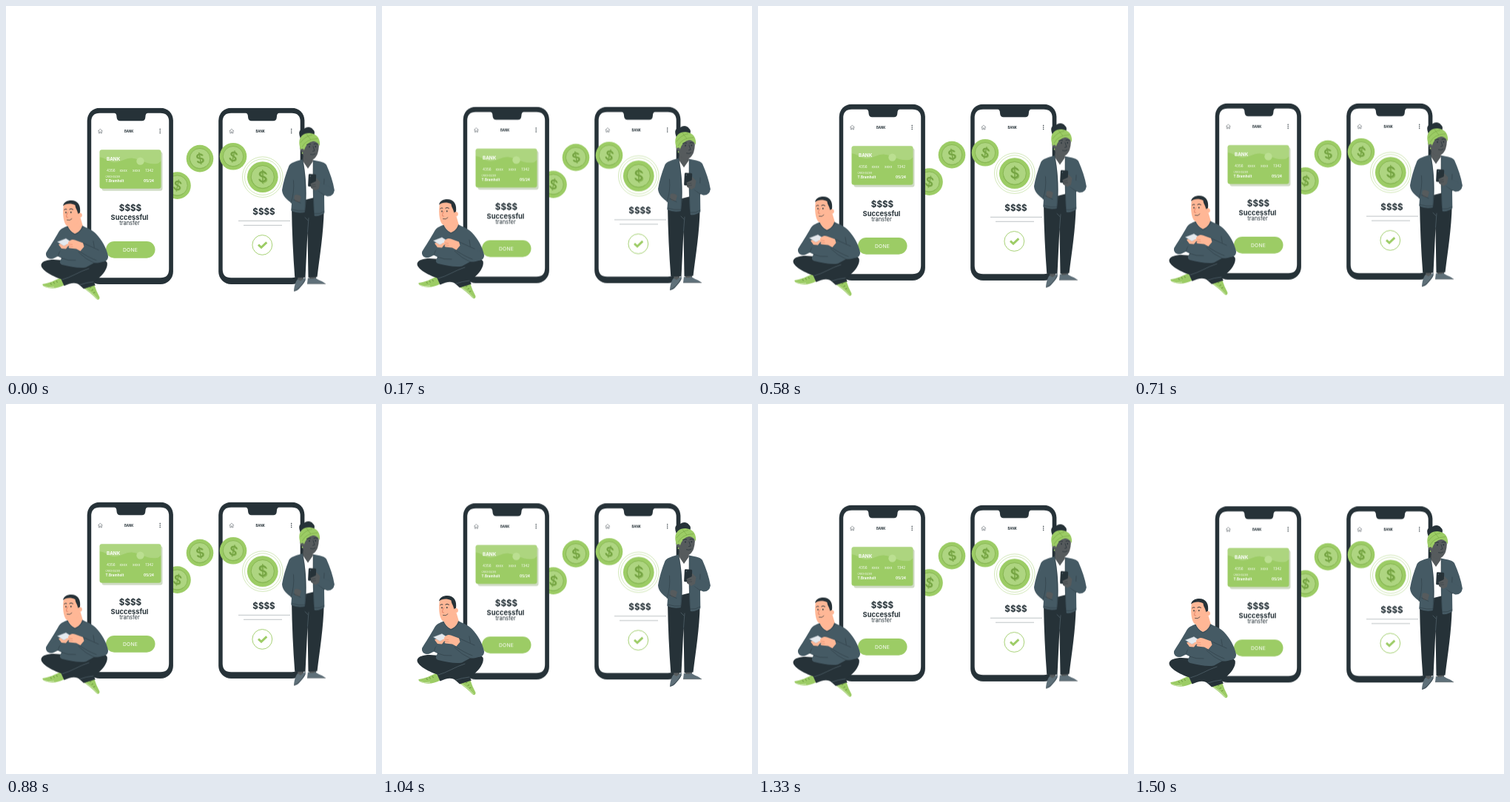
Recreate the animation shown at these times as an HTML page. Size 500x500 px, loop 1540 ms.

```html
<!DOCTYPE html>
<html lang="en">
<head>
<meta charset="utf-8">
<title>Bank transfer</title>
<style>
  html, body { margin: 0; width: 100%; height: 100%; overflow: hidden; background: #fff; }
  svg { display: block; width: 100vw; height: 100vh; }
  #scene { animation: float 770ms linear -40ms infinite alternate; }
  @keyframes float { to { transform: translateY(-6.8px); } }

  text { font-family: Inter, "Open Sans", sans-serif; fill: #263238; }
  .mid { text-anchor: middle; }
  .bold { font-weight: 700; }
  .card text, text.white { fill: #fff; }
  .navy { fill: #263238; }
  .slate { fill: #455a64; }
  .green { fill: #9ccc65; }
  .skin { fill: #ffb796; }
  .dusk { fill: #565b5d; }
  .line { fill: none; stroke: #263238; stroke-width: .7; stroke-linecap: round; stroke-linejoin: round; }
  .thin { stroke-width: .4; }
  .brow { stroke-width: .95; }
  .fold { fill: none; stroke: #263238; stroke-width: .6; stroke-linecap: round; opacity: .7; }
  .pale { fill: none; stroke: #5d7079; stroke-width: .6; stroke-linecap: round; }
  .leaf { fill: none; stroke: #9ccc65; }
</style>
</head>
<body>
<svg viewBox="0 0 500 500">
  <defs>
    <g id="phone">
      <rect class="navy" y="138" width="116.2" height="238.3" rx="17"/>
      <path fill="#fff" d="M17 145H37q2 0 2.500 2.500l.5 4q.7 4 4.500 4H74q4 0 4.500-4l.5-4q.5-2.500 2.500-2.500H99q11.500 0 11.500 11.500V356q0 11.500-11.500 11.500H17q-11.500 0-11.500-11.500V156.500q0-11.500 11.500-11.500z"/>
      <path class="line thin" d="M15 169.300l2.700-3 2.700 3M15.600 168.700v3.600h1.400v-2h1.400v2h1.400v-3.600"/>
      <g class="navy">
        <circle cx="98.500" cy="166.900" r=".75"/>
        <circle cx="98.500" cy="169.400" r=".75"/>
        <circle cx="98.500" cy="171.900" r=".75"/>
      </g>
      <text class="mid bold" x="56.500" y="171.500" font-size="4.300">BANK</text>
    </g>
    <g id="coin">
      <circle class="green" r="18.300"/>
      <circle r="13.700" fill="#aed581" stroke="#7fae4a" stroke-width=".7"/>
      <path fill="none" stroke="#86b852" stroke-width=".8" d="M-13 3A13.300 13.300 0 0 0 8 10.600"/>
    </g>
    <g id="dollar" class="mid" font-size="17.500" font-weight="500">
      <text x="1" y="6.500" style="fill:#8dbb59">$</text>
      <text y="6.200" style="fill:#75a443">$</text>
    </g>
  </defs>

  <g id="scene">
    <g transform="translate(231.500 243)">
      <use href="#coin"/>
      <use href="#dollar" transform="rotate(12)"/>
    </g>
    <use href="#phone" x="109.700"/>
    <use href="#phone" x="287.200"/>

    <g class="card">
      <rect x="129.500" y="197.500" width="82" height="52.500" rx="3" fill="#d0dbc5"/>
      <rect class="green" x="126.500" y="194.700" width="83" height="52.500" rx="3"/>
      <path fill="#fff" opacity=".17" d="M126.500 204.500C134 205 139 211.500 147 211.500S162 205.500 171 206 189 213.500 199 213.500 206 211.500 209.500 210V197.700q0-3-3-3H129.500q-3 0-3 3z"/>
      <circle cx="181.500" cy="210" r="5.200" fill="#bbdf91"/>
      <text class="bold" x="136" y="208.900" font-size="6.300">BANK</text>
      <g font-size="4.700">
        <text x="136" y="224.400">4356</text>
        <text x="153.500" y="224.400">xxxx</text>
        <text x="171" y="224.400">xxxx</text>
        <text x="188.500" y="224.400">1342</text>
      </g>
      <text x="134.500" y="232" font-size="2.900">CARDHOLDER</text>
      <text class="bold" x="134.500" y="238.300" font-size="4.600">T.Bramholt</text>
      <text class="bold" x="186" y="238.300" font-size="4.700">05/24</text>
    </g>

    <g class="mid">
      <text class="bold" x="168" y="277.300" font-size="11.600">$$$$</text>
      <text class="bold" x="167" y="288.900" font-size="9.300">Successful</text>
      <text x="167" y="296.700" font-size="7.500">transfer</text>
      <rect class="green" x="135" y="318.400" width="66.500" height="22.600" rx="11.300"/>
      <text class="white" x="168" y="331.900" font-size="6.700" letter-spacing=".2">DONE</text>
      <text class="bold" x="348.500" y="281.900" font-size="11.600">$$$$</text>
    </g>
    <path fill="none" stroke="#7d868a" stroke-width=".5" d="M314 290.700H384M321 296.700H373"/>
    <circle class="leaf" cx="346.300" cy="323.300" r="13.400" stroke-width=".9"/>
    <path class="leaf" stroke-width="2.900" d="M341 323l4 3.700 7.300-7"/>

    <g transform="translate(262 206.500)">
      <use href="#coin"/>
      <use href="#dollar" transform="rotate(-10)"/>
    </g>
    <g transform="translate(307 203.600)">
      <use href="#coin"/>
      <use href="#dollar" transform="rotate(14)"/>
    </g>
    <g transform="translate(346.800 231.500)">
      <circle class="leaf" r="27.300" stroke-width=".45"/>
      <circle class="leaf" r="24.300" stroke-width=".45"/>
      <use href="#coin" transform="scale(1.140)"/>
      <use href="#dollar" transform="scale(1.140)"/>
    </g>

    <g id="man">
      <path class="green" d="M49.500 376C58 375 67 371 74 367L78.500 377.500C72 381 64 383 56 381 52 380 49 378.500 49.500 376z"/>
      <path class="green" d="M104.500 381L119 375.500C121 383 124 389 126.300 393.500 127.300 396.500 124.500 398.500 122 396 117 390.500 111 386 104.500 381z"/>
      <path fill="none" stroke="#e7f3d8" stroke-width=".7" d="M51 379Q57 382 65 380M108 382.500Q118 389 123.500 396"/>
      <path fill="none" stroke="#557d2d" stroke-width=".7" d="M60 374.500l1.500 2.500M64 373l1.500 2.500M68 371.500l1.500 2.500M113 381l2.500-1M115.500 384.500l2.500-1M118 388l2.500-1"/>
      <path class="navy" d="M72 343.500C61 342 49 343.500 47.500 350 47 357 62 365 74.500 369.500L78.500 378.500C88 374 95 373 100 378L105 382.500 121 377.500C118 374 120 372 125 368.500 131 363 138 355 136.700 347 133 341 122 343 110 347z"/>
      <path class="pale" d="M76 370C88 367 99 359 112 355M100 377Q108 374 118 373"/>

      <path class="skin" d="M83 290L100.500 286 104 298Q102 306 93 308.500 86 304 83.500 298z"/>
      <path class="slate" d="M83.500 297.500C78 299.500 73.500 301.500 71 306 66 315 59 326 54.300 333.500 52.500 339 58 343 64 341.500L70 338.500 75 341C73 345 71 348 76 350 87 353 100 355 108 353.500L119 347.500C127 348 138 345 138 338.500 136 327 129 316 122 308.500 117 302.500 109 300.500 103 297 102 302 98 306.500 93 308 88 305.500 85 302 83.500 297.500z"/>
      <path class="fold" d="M83 298.800Q87 306 93 309.200 100 306.500 104 299M70 338.500Q74 331 75 321M118 318Q120 326 119 333M119 347.500Q108 343 98 333M75 341Q84 345 94 344"/>
      <path class="slate" d="M54.300 334L72 322 77 327.500 63 341.500Q54 343 54.300 334z"/>
      <path class="slate" d="M104 320L125 329.500 137 336Q140 345 130 346 120 345.500 99 331.500z"/>
      <path class="fold" d="M104 320.500L125 330M99 331.500Q112 340.500 122 344"/>

      <path class="skin" d="M71 322.500L80 319 86 322 81 328.500 75 328z"/>
      <path d="M69.500 319L81 314.600 89 319.800 78 324.500z" fill="#e4e9ee" stroke="#aeb9c1" stroke-width=".5"/>
      <path class="skin" d="M84 319.500Q88 314.500 93 316.500L104 320.500 105.500 325.500 100.500 331.500 95 328.500 86 327.500Q83 326.500 86 324.800L81.500 324Q80 322 84 321.800z"/>
      <path d="M85 322l5 .6M86 324.800l4.500.6" fill="none" stroke="#dc8065" stroke-width=".5"/>

      <path class="skin" d="M77.800 270C76.500 279 77 290 80.800 296 84 300 91 298 95.500 294 100 291 101.500 281 99 271 92 264 82 265 77.800 270z"/>
      <path class="navy" d="M77 270.500C78 265.500 82 263 88.500 263 96 263.200 100.500 268 100.200 277L99.300 284.500 97 280C96 275 94 274.500 93.500 269.500 88 266.500 81 267 77 270.500z"/>
      <circle class="skin" cx="100" cy="283" r="2.900"/>
      <path class="line brow" d="M78.800 275.600Q80.500 274 82 275M85.800 275Q88 273.200 90.500 275.200"/>
      <g class="navy">
        <ellipse cx="81" cy="279.300" rx=".8" ry="1.100"/>
        <ellipse cx="87.800" cy="279.200" rx=".8" ry="1.100"/>
      </g>
      <path d="M83.500 279Q81 284 81.500 285.500L84 286" fill="none" stroke="#d9735a" stroke-width=".7"/>
      <path class="line" d="M82.500 289.500Q86.500 291 89 287.800"/>
    </g>

    <g id="woman">
      <path class="dusk" d="M393 362H402V372L396 378z M409 361H419V371L410 372z"/>
      <path fill="#5f7079" d="M389 385.500C389.500 379 391 373 394 369.500L398 372 404.500 367C406 370 403 375 399 379 396 383 393 386 389 385.500z"/>
      <path fill="#5f7079" d="M407 375.500L408 367.500Q413 370.500 418 367.500C422 371 428 372 431.500 375.500z"/>
      <path fill="none" stroke="#263238" stroke-width=".6" d="M389 385.800Q398 382 404.500 370M407 375.700H432"/>
      <path class="navy" d="M386 271C386.500 305 388 337 390.300 367.500L404.500 367.300 407.500 306 408.500 367 420.500 366.500C424 338 429 308 429.700 275L421 259H397z"/>
      <path class="pale" d="M407.500 306L409 287M404 286l4 4"/>

      <path class="dusk" d="M402 199H414L415 212 408 222 401 211z"/>
      <path fill="#fff" d="M400.500 209L408 220 415 210 417 259 405 262z"/>
      <path class="slate" d="M401 207.500C394 209.500 386 211 382.500 216 378 227 374.500 239 373 249 373.300 257 380 262 386 267L385.300 277Q394 281 404 279C407 258 406 232 401 207.500z"/>
      <path class="slate" d="M415 208.500C421 210 429 210 433 215 438 226 442 238 443.800 249 443 256 436 258 430 256L430.300 280Q424 285 416.500 284C414.500 263 415 235 415 208.500z"/>
      <path class="fold" d="M401 208Q406.500 234 404 279M415 209Q414 245 416.500 284M385 267Q390 252 388.500 236M430 256Q429 246 430 234M430 256L422 250M386 275Q395 278 404 277M417 281Q424 282 430 278"/>
      <path class="dusk" d="M390 256Q395 254 399 258L397 265 392 265Q388 262 390 256z"/>
      <path class="fold" d="M388.500 262L398 266.500"/>

      <path class="slate" d="M424 239L436 244 443.500 249Q443 258 434 257.500L420 249z"/>
      <path class="dusk" d="M412 237L419 232.500 424.500 238 423 247 418 250 412 246z"/>
      <rect x="408.500" y="227.500" width="10.300" height="17" rx="1.500" fill="#263238" transform="rotate(3 414 236)"/>
      <circle cx="411.300" cy="230.300" r=".7" fill="#5f7079"/>
      <path class="dusk" d="M411.500 240.500L420 236.500 423 239 422 246 413 246.500z"/>
      <path class="line thin" d="M413 242.300l5-1M413.500 244.600l5-.6"/>

      <path class="navy" d="M397.500 178C395 172 396 166.500 402 167 406 162.500 413 163.500 415 167.500 418.500 170 417 176 413 178z"/>
      <path class="dusk" d="M399 185C398.500 196 401 206 408 208.500 414 210 419 206 421.300 199 423 193 423.500 187 421.500 181L403 180z"/>
      <path class="navy" d="M398 187L404 185 402.500 193 399.500 197Q396.500 193 398 187z"/>
      <path class="green" d="M396.700 189C394.500 178 401 172 410 172 419 172.500 425.300 178.500 424 189.500Q421 183.500 415 183 406.500 184 402.500 196 397.500 197 396.700 189z"/>
      <path fill="none" stroke="#6f9d3c" stroke-width=".5" d="M398 185Q404 176 414 174.500M400 191Q405 180 421 179.500M406 173.500L412 181"/>
      <circle class="dusk" cx="400.500" cy="195.500" r="2.300"/>
      <circle class="green" cx="400.500" cy="199" r=".9"/>
      <path class="line brow" d="M406.500 187.600Q409 185.800 411.500 187M416 186.900Q418.500 185.500 420.500 187"/>
      <g class="navy">
        <ellipse cx="410" cy="190.400" rx=".9" ry="1"/>
        <ellipse cx="418.300" cy="190.200" rx=".9" ry="1"/>
      </g>
      <path class="line" d="M415 190L417 196 414.500 196.500M411.500 200.800Q415 202.300 418 200"/>
    </g>
  </g>
</svg>
</body>
</html>
```
